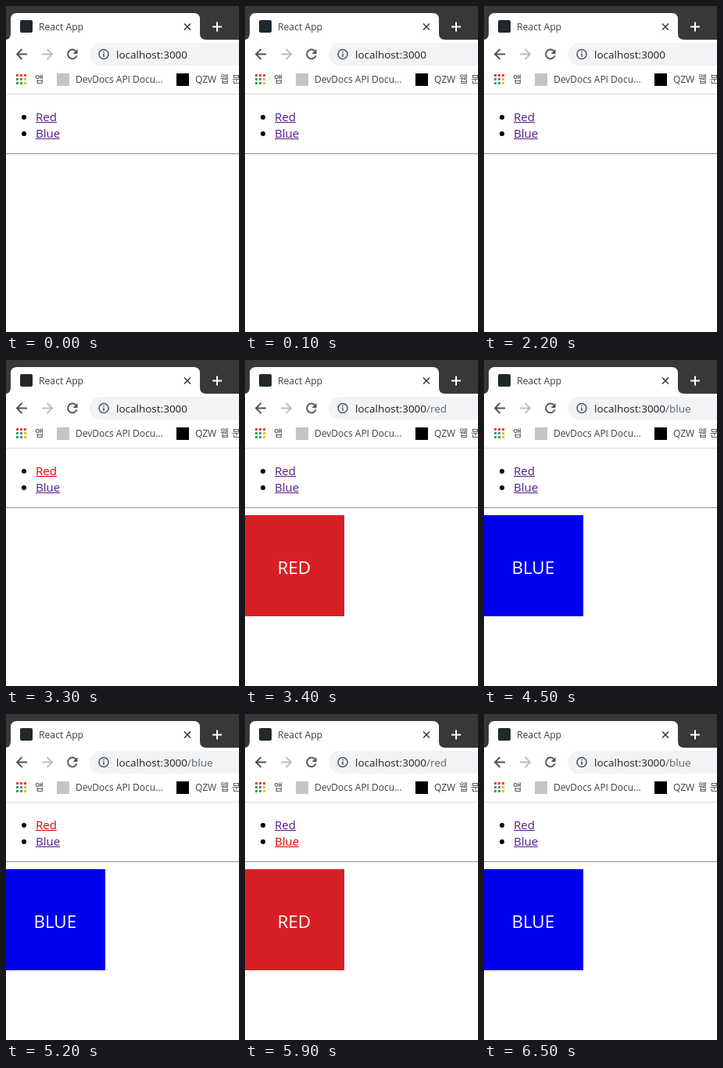
These frames come from a looping animation (298 by 416 pixels, 8.2 s). An HTML page:

```html
<!DOCTYPE html>
<html lang="ko">
<head>
<meta charset="utf-8">
<title>React App</title>
<style>
  html, body { margin: 0; width: 100%; height: 100%; overflow: hidden; background: #fff; }
  svg { display: block; width: 298px; height: 416px; }
  text { font-family: "Open Sans", "Noto Sans CJK KR", "Noto Sans CJK", "Noto Sans", sans-serif; white-space: pre; }
  .small { font-size: 12px; fill: #3c4043; }
  .url { font-size: 13.5px; fill: #202124; }
  .url tspan { fill: #5f6368; }
  .link { font-size: 15px; fill: #551a8b; }
  .label { font-size: 22.4px; fill: #fff; text-anchor: middle; }
  .icon { fill: none; stroke: #505357; stroke-width: 1.9; }
</style>
</head>
<body>
<svg viewBox="0 0 298 416">
  <rect width="298" height="416" fill="#fff"/>

  <!-- tab strip -->
  <rect width="298" height="43" fill="#383838"/>
  <path d="M0 43Q6 42 6 35V17Q6 9 14 9H240Q248 9 248 17V35Q248 43 256 43Z" fill="#fff"/>
  <rect x="18" y="18" width="16" height="16" rx="2" fill="#20282c"/>
  <text class="small" x="42" y="30.5" style="font-size:12.2px">React App</text>
  <path class="icon" d="M228 22.5l8 8m0-8l-8 8" style="stroke:#3c4043;stroke-width:1.7"/>
  <path class="icon" d="M264 26.5h12m-6-6v12" style="stroke:#fff;stroke-width:2"/>

  <!-- toolbar -->
  <path class="icon" d="M27 61.5H14m6.5-6.5L14 61.5l6.500 6.500"/>
  <path class="icon" d="M46 61.500H59m-6.500-6.500L59 61.500l-6.500 6.500" style="stroke:#bcbec0"/>
  <path class="icon" d="M89.200 57.300A5.900 5.900 0 1 0 90.600 63.300"/>
  <path d="M91.500 55v6h-6z" fill="#505357"/>
  <rect x="107" y="47" width="220" height="29" rx="14.500" fill="#f1f3f4"/>
  <circle class="icon" cx="125" cy="61.500" r="6" style="stroke-width:1.500"/>
  <path class="icon" d="M125 60.500v4.500m0-7.300v1.600" style="stroke-width:1.500"/>
  <text class="url" x="141" y="66.500">localhost:3000<tspan id="path"></tspan></text>

  <!-- bookmarks -->
  <g id="apps"></g>
  <text class="small" x="37" y="98">앱</text>
  <rect x="65" y="86" width="16" height="16" fill="#c4c4c4"/>
  <text class="small" x="89" y="98">DevDocs API Docu...</text>
  <rect x="218" y="86" width="16" height="16" fill="#000"/>
  <text class="small" x="242" y="98">QZW</text>
  <text class="small" x="274" y="98">웹</text>
  <text class="small" x="289" y="98">문</text>
  <rect y="112" width="298" height="1" fill="#d8dadc"/>

  <!-- page -->
  <circle cx="23" cy="142" r="3" fill="#000"/>
  <circle cx="23" cy="163" r="3" fill="#000"/>
  <g id="redLink" class="link">
    <text x="38" y="147">Red</text><rect x="38" y="148" width="27" height="1"/>
  </g>
  <g id="blueLink" class="link">
    <text x="38" y="168">Blue</text><rect x="38" y="169" width="31" height="1"/>
  </g>
  <rect y="188" width="298" height="1" fill="#909090"/>
  <g id="box">
    <rect id="fill" y="198" width="127" height="129"/>
    <text id="label" class="label" x="62.8" y="273"></text>
  </g>
</svg>
<script>
const LOOP = 8200;
const $ = id => document.getElementById(id);
const pages = {
  home: { path: '', label: '', color: 'none' },
  red: { path: '/red', label: 'RED', color: '#d91f26' },
  blue: { path: '/blue', label: 'BLUE', color: '#0000ee' }
};
// time, page shown, link being pressed
const steps = [
  [0, 'home', ''],
  [3300, 'home', 'red'],
  [3400, 'red', ''],
  [4400, 'red', 'blue'],
  [4500, 'blue', ''],
  [5200, 'blue', 'red'],
  [5300, 'red', ''],
  [5900, 'red', 'blue'],
  [6000, 'blue', '']
];

const red = '#ea4335', green = '#34a853', blue = '#4285f4', yellow = '#fbbc05';
$('apps').innerHTML = [red, red, red, green, blue, yellow, green, green, yellow]
  .map((c, i) => `<rect x="${13 + i % 3 * 5}" y="${87 + Math.floor(i / 3) * 5}" width="3" height="3" fill="${c}"/>`)
  .join('');

let shown = null;
function show(step) {
  if (step === shown) return;
  shown = step;
  const [, name, pressed] = step;
  const page = pages[name];
  $('path').textContent = page.path;
  $('label').textContent = page.label;
  $('fill').setAttribute('fill', page.color);
  for (const link of ['red', 'blue'])
    $(link + 'Link').style.fill = $(link + 'Link').firstElementChild.style.fill =
      pressed === link ? '#e60000' : '#551a8b';
}

let start = null;
function tick(now) {
  if (start === null) start = now;
  const t = (now - start) % LOOP;
  show(steps.filter(s => s[0] <= t).pop());
  requestAnimationFrame(tick);
}
show(steps[0]);
requestAnimationFrame(tick);
</script>
</body>
</html>
```
